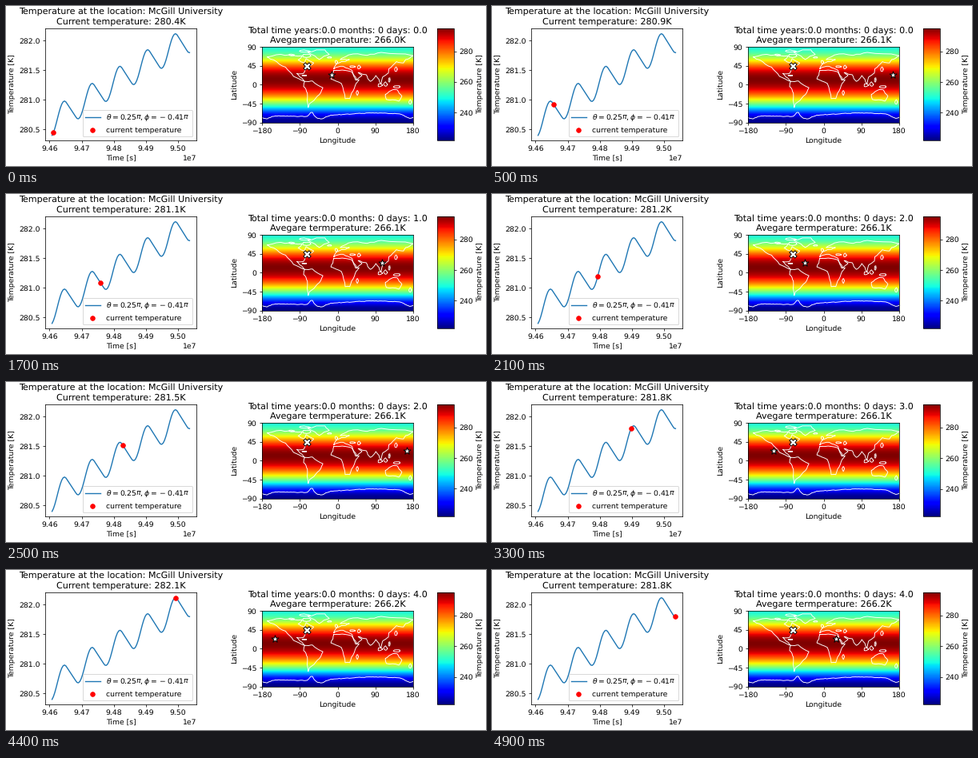
These frames come from a looping animation (600 by 200 pixels, 5000 ms). A matplotlib script:

```python
import numpy as np
import matplotlib.pyplot as plt
from matplotlib.animation import FuncAnimation

plt.rcParams.update({"font.family": "DejaVu Sans", "text.hinting": "none"})

WIDTH, HEIGHT = 600, 200
FRAMES, INTERVAL = 50, 100
DAY = 86400
START = 3 * 365 * DAY
SITE_LON, SITE_LAT = -0.41 * 180, 0.25 * 180
SUN_LAT = 23

rng = np.random.default_rng(4)
fig = plt.figure(figsize=(9, 3), dpi=200 / 3, facecolor="white")


def pixel_axes(left, top, right, bottom):
    return fig.add_axes([left / WIDTH, 1 - bottom / HEIGHT,
                         (right - left) / WIDTH, (bottom - top) / HEIGHT])


def local_temperature(days):
    """Daily heating by the sun, steady cooling and a slow seasonal rise."""
    fine = np.linspace(0, 5, 5001)
    sunlight = np.maximum(0, 0.281 + 0.649 * np.cos(2 * np.pi * (fine - 0.19)))
    rate = 2.77 * (sunlight - 0.26) + 0.013 - 0.0095 * fine
    total = np.concatenate([[0], np.cumsum((rate[1:] + rate[:-1]) / 2) * fine[1]])
    return 280.395 + np.interp(days, fine, total)


def zonal_temperature(lat):
    """Mean temperature by latitude, flat at the poles, warmest near 15 N."""
    s = np.sin(np.radians(lat))
    return 293 + 18.1 * s - 39.4 * s**2 - 4.1 * s**3 - 17.1 * s**4


def sun_longitude(days):
    """Subsolar longitude, snapped to the 15 degree grid of the model."""
    lon = 15 * np.floor(-360 * days / 15 + 1e-6) + 15
    return (lon + 180) % 360 - 180


# Temperature at one place
steps = np.arange(100) * 0.05
history = local_temperature(steps)
seconds = START + steps * DAY

ax = pixel_axes(49, 28, 238, 168)
ax.plot(seconds, history, label=r"$\theta = 0.25 \pi, \phi = -0.41 \pi$")
dot = ax.scatter([seconds[1]], [history[1]], color="red", zorder=3,
                 label="current temperature")
span = seconds[-1] - seconds[0]
ax.set_xlim(START - 0.05 * span, START + 1.05 * span)
ax.set_ylim(280.31, 282.21)
ax.set_yticks(np.arange(280.5, 282.1, 0.5))
ax.set_xlabel("Time [s]")
ax.set_ylabel("Temperature [K]")
ax.legend(loc="lower right")

# World map
world = pixel_axes(320, 51.2, 509, 145.7)
field = zonal_temperature(np.linspace(-89.5, 89.5, 180))[:, None]
image = world.imshow(field, cmap="jet", origin="lower", aspect="auto",
                     extent=(-180, 180, -90, 90), vmin=222, vmax=295)


def draw_coast(lon, lat):
    world.plot(lon, lat, color="white", lw=1, zorder=2)


def continent(*corners, roughness=0.09):
    """Closed outline whose edges are broken up by midpoint displacement."""
    shore = np.array([lon + 1j * lat for lon, lat in corners])
    for _ in range(2):
        edge = np.roll(shore, -1) - shore
        bend = 1j * roughness * rng.uniform(-1, 1, len(shore))
        shore = np.column_stack([shore, shore + edge * (0.5 + bend)]).ravel()
    shore = np.append(shore, shore[0])
    draw_coast(shore.real, shore.imag)


def island(lon, lat, half_width, half_height):
    angle = np.linspace(0, 2 * np.pi, 9)
    radius = rng.uniform(0.8, 1.2, 9)
    radius[-1] = radius[0]
    draw_coast(lon + half_width * radius * np.cos(angle),
               lat + half_height * radius * np.sin(angle))


def antarctica():
    """Shore with the peninsula, the Weddell Sea and the Ross Sea."""
    lon = np.linspace(-180, 180, 91)

    def bump(center, width):
        return np.exp(-((lon - center) / width) ** 2)

    lat = -71.5 + 4 * np.sin(np.radians(lon)) + rng.uniform(-0.7, 0.7, lon.size)
    lat += 11 * bump(-62, 6) - 7 * bump(-40, 14)
    lat -= 9 * (bump(-172, 15) + bump(172, 15))
    draw_coast(lon, lat)


# North America, South America, Greenland
continent((-167, 66), (-125, 70), (-84, 69), (-94, 59), (-79, 52), (-75, 62),
          (-57, 52), (-70, 43), (-81, 27), (-97, 27), (-89, 18), (-79, 8),
          (-105, 20), (-124, 42), (-152, 59))
continent((-78, 8), (-60, 9), (-35, -7), (-48, -27), (-67, -45), (-70, -54),
          (-72, -20), (-81, -4))
continent((-70, 77), (-30, 83), (-20, 72), (-44, 60), (-53, 68))
# Africa, Eurasia, Australia
continent((-9, 34), (11, 35), (33, 31), (43, 11), (51, 12), (40, -8),
          (29, -33), (18, -33), (9, 3), (-16, 14))
continent((-9, 38), (-4, 48), (9, 55), (28, 60), (6, 60), (26, 71), (70, 70),
          (104, 77), (180, 69), (162, 60), (157, 52), (140, 55), (122, 38),
          (121, 28), (107, 18), (103, 2), (91, 22), (78, 8), (68, 24),
          (49, 29), (58, 22), (45, 13), (35, 33), (27, 38), (13, 44))
continent((114, -23), (131, -12), (142, -12), (153, -27), (146, -39), (116, -35))
antarctica()

for place in [(-3, 54, 3, 4), (-19, 65, 5, 1.5), (-74, 69, 10, 4),
              (-110, 71, 6, 2), (-80, 80, 12, 2.5), (47, -19, 2.5, 6),
              (139, 37, 3, 5), (114, 1, 4, 5), (101, -1, 5, 4),
              (141, -5, 8, 3), (123, 12, 2, 5), (173, -41, 3, 5),
              (-79, 22, 5, 1), (51, 42, 3, 5), (35, 43, 6, 2)]:
    island(*place)

world.scatter([SITE_LON], [SITE_LAT], marker="X", s=100, color="white",
              edgecolor="black", zorder=4)
sun = world.scatter([0], [SUN_LAT], marker="*", s=100, color="white",
                    edgecolor="black", zorder=4)
world.set(xlim=(-180, 180), ylim=(-90, 90),
          xticks=range(-180, 181, 90), yticks=range(-90, 91, 45),
          xlabel="Longitude", ylabel="Latitude")

colorbar = fig.colorbar(image, cax=pixel_axes(539, 28, 560, 168),
                        ticks=range(240, 281, 20), label="Temperature [K]")


def update(frame):
    index = 2 * frame + 1
    dot.set_offsets([[seconds[index], history[index]]])
    ax.set_title("Temperature at the location: McGill University\n"
                 f"Current temperature: {history[index]:.1f}K")

    sun.set_offsets([[sun_longitude(steps[index]), SUN_LAT]])
    average = 266.038 + 0.0031 * frame
    world.set_title(f"Total time years:0.0 months: 0 days: {frame // 10}.0\n"
                    f"Avegare termperature: {average:.1f}K")
    image.set_clim(221.8 + 0.4 * frame / (FRAMES - 1), 295)
    return dot, sun, image


anim = FuncAnimation(fig, update, frames=FRAMES, interval=INTERVAL, repeat=True)
plt.show()
```
